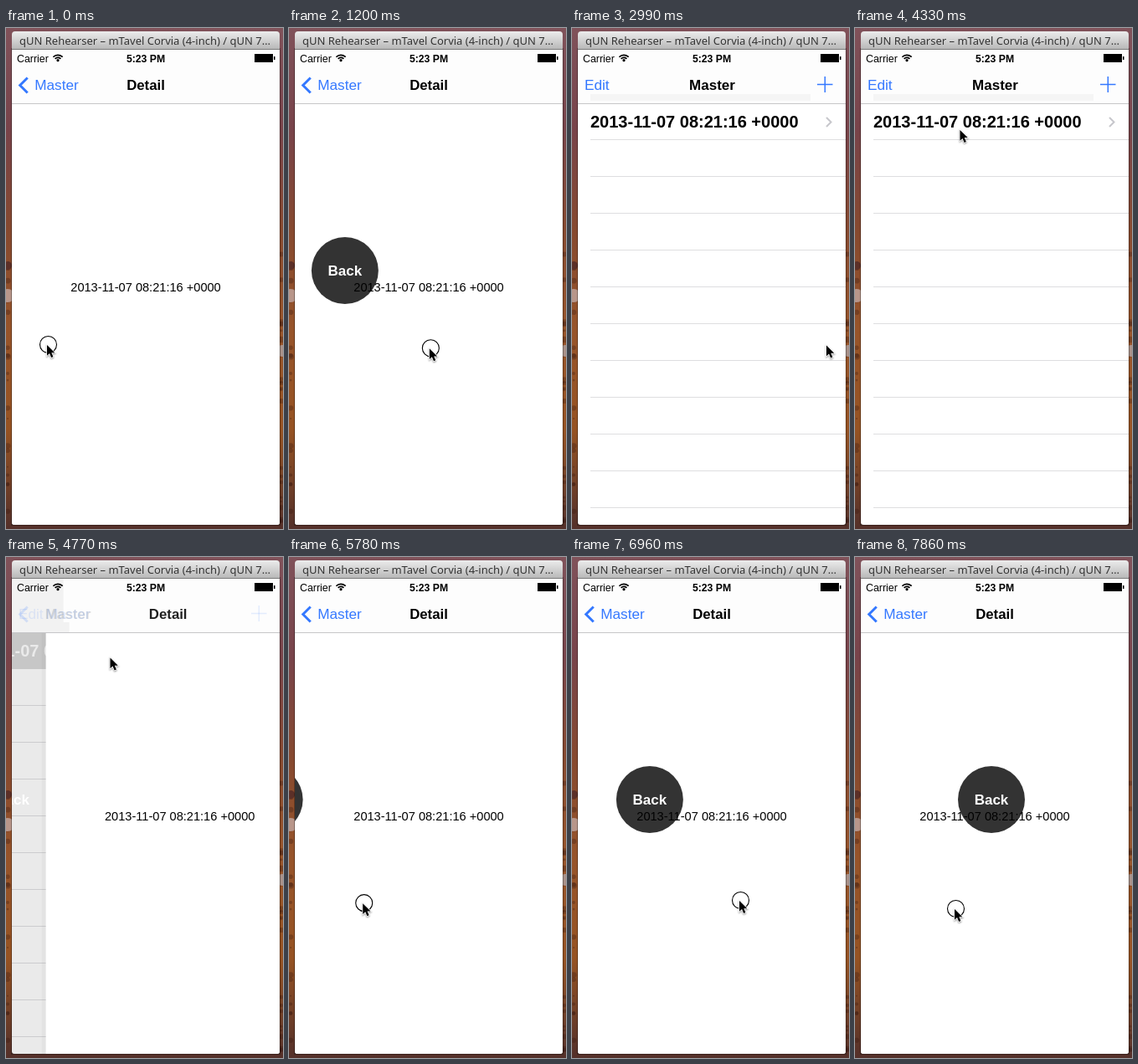
These frames come from a looping animation (331x599 px, 8 s). An HTML page with a canvas:

```html
<!DOCTYPE html>
<html lang="en">
<head>
<meta charset="utf-8">
<title>Swipe back</title>
<style>
html, body { margin: 0; width: 100%; height: 100%; overflow: hidden; }
canvas { display: block; width: 331px; height: 599px; }
</style>
</head>
<body>
<canvas id="stage"></canvas>
<script>
const W = 331, H = 599, LOOP = 8000, TICK = 148, LAST_TICK = 53;
const LEFT = 7, RIGHT = 327, TOP = 26, NAV = 90, BOTTOM = 594;
const POP = 2575, HIGHLIGHT = 4420, PUSH = 4573, PRESS = 5300, TURN = 7050, END = 7844;
const SANS = '"Liberation Sans", Arial, sans-serif';
const BLUE = '#3478ff', STAMP = '2013-11-07 08:21:16 +0000';
const canvas = document.getElementById('stage');
const ctx = canvas.getContext('2d');
const dpr = window.devicePixelRatio || 1;
canvas.width = W * dpr;
canvas.height = H * dpr;

const lerp = (a, b, k) => a + (b - a) * k;

function ease(from, to, t) {
  const u = Math.min(1, Math.max(0, (t - from) / (to - from)));
  return u * u * (3 - 2 * u);
}

// Critically damped spring: 1 at the start, settling to 0.
function spring(ms) {
  const x = Math.max(0, ms) * 0.022;
  return x > 8 ? 0 : (1 + x) * Math.exp(-x);
}

// 0 = detail on screen, 1 = master on screen
const pageShift = t => t < 3800 ? 1 - spring(t - POP) : spring(t - PUSH);
const isPressed = t => t < POP || t >= PRESS;

// Each stroke eases the pointer to a new place, bowing down a little on the way.
const STROKES = [
  { from: 320, to: 2130, x: 305.5, y: 379, bow: 4 },
  { from: 3440, to: 4330, x: 126, y: 120, bow: 0 },
  { from: 4780, to: PRESS, x: 62, y: 413, bow: 0 },
  { from: 5350, to: 6825, x: 201.5, y: 410.5, bow: 2 },
  { from: TURN, to: END, x: 120.5, y: 420.5, bow: 0 }
];

function pointerAt(t) {
  let x = 50.5, y = 378.5;
  for (const s of STROKES) {
    const k = ease(s.from, s.to, t);
    x = lerp(x, s.x, k);
    y = lerp(y, s.y, k) + s.bow * Math.sin(Math.PI * k);
  }
  return { x, y };
}

// The badge follows the drag from beyond the left edge.
function badgeAt(t, x) {
  if (t < 3000) return Math.min(167, x - 102.5);
  if (!isPressed(t)) return -33;
  return t < TURN ? x * 1.04 - 116.7 : lerp(92.5, 163, ease(TURN, END, t));
}

function text(s, x, y, size, color, { bold = false, align = 'left', alpha = 1, family = SANS } = {}) {
  if (alpha <= 0) return;
  ctx.save();
  ctx.globalAlpha *= alpha;
  ctx.font = (bold ? 'bold ' : '') + size + 'px ' + family;
  ctx.textAlign = align;
  ctx.fillStyle = color;
  ctx.fillText(s, x, y);
  ctx.restore();
}

function box(x, y, w, h, color) {
  ctx.fillStyle = color;
  ctx.fillRect(x, y, w, h);
}

function line(points, color, width, alpha = 1) {
  ctx.save();
  ctx.globalAlpha *= Math.max(0, alpha);
  ctx.beginPath();
  points.forEach(p => ctx.lineTo(...p));
  ctx.strokeStyle = color;
  ctx.lineWidth = width;
  ctx.stroke();
  ctx.restore();
}

function disc(x, y, r, color) {
  ctx.beginPath();
  ctx.arc(x, y, r, 0, Math.PI * 2);
  ctx.fillStyle = color;
  ctx.fill();
}

function fade(y0, y1, colors) {
  const g = ctx.createLinearGradient(0, y0, 0, y1);
  colors.forEach((color, i) => g.addColorStop(i / (colors.length - 1), color));
  return g;
}

function wallpaper() {
  box(0, 0, W, H, fade(0, H, ['#80525a', '#78434a', '#86492f', '#97542a', '#965323', '#54302a']));
  let seed = 11;
  const random = () => (seed = seed * 16807 % 2147483647) / 2147483647;
  for (let i = 0; i < 40; i++) {
    const x = random() < 0.5 ? 2 : 329;
    disc(x, lerp(270, 590, random()), 1 + 3 * random(), 'rgba(50,20,12,.3)');
  }
  disc(2, 284, 5, '#5c3028');
  disc(2, 320, 8, '#b8968a');
  disc(330, 386, 7, '#a89088');
  box(LEFT - 1, 24, RIGHT - LEFT + 2, BOTTOM - 23, 'rgba(0,0,0,.3)');
}

function titleBar() {
  ctx.beginPath();
  ctx.roundRect(LEFT, 4, RIGHT - LEFT, 22, [4, 4, 0, 0]);
  ctx.fillStyle = fade(4, 26, ['#ececec', '#b6b6b6']);
  ctx.fill();
  box(LEFT, 25, RIGHT - LEFT, 1, '#7c7c7c');
  text('qUN Rehearser – mTavel Corvia (4-inch) / qUN 7…', 16, 20, 13, '#333',
    { family: '"Noto Sans", sans-serif' });
}

function master(shift, lit) {
  const x = LEFT - 96 * (1 - shift);
  box(LEFT, NAV, RIGHT - LEFT, BOTTOM - NAV, '#fff');
  for (let y = 133; y < BOTTOM; y += 44) box(x + 15, y, 305, 1, '#dedee0');
  ctx.save();
  ctx.globalAlpha = lit;
  box(x, 91, 320, 43, '#d9d9d9');
  ctx.restore();
  text(STAMP, x + 15, 119, 20, '#000', { bold: true, alpha: 1 - lit });
  text(STAMP, x + 15, 119, 20, '#fff', { bold: true, alpha: lit });
  line([[x + 297, 107], [x + 302.5, 112.5], [x + 297, 118]], '#c7c7cc', 2);
  box(LEFT, NAV, RIGHT - LEFT, BOTTOM - NAV, `rgba(0,0,0,${0.095 * (1 - shift)})`);
}

function detail(off) {
  if (off > 0) box(LEFT + off - 5, NAV, 5, BOTTOM - NAV, 'rgba(0,0,0,.03)');
  box(LEFT + off, NAV, RIGHT - LEFT, BOTTOM - NAV, '#fff');
  text(STAMP, 167 + off, 315, 14.6, '#000', { align: 'center' });
}

function badge(x, solid) {
  if (solid) disc(x, 290, 40, 'rgba(0,0,0,.8)');
  text('Back', x, 296, 17, '#fff', { bold: true, align: 'center' });
}

function statusBar() {
  text('Carrier', 13, 41, 12.4, '#000');
  text('5:23 PM', 167, 41, 12.2, '#000', { bold: true, align: 'center' });
  ctx.strokeStyle = '#000';
  ctx.lineWidth = 1.7;
  for (const r of [4.6, 7.7]) {
    ctx.beginPath();
    ctx.arc(62, 40, r, -Math.PI * 0.76, -Math.PI * 0.24);
    ctx.stroke();
  }
  disc(62, 38.7, 1.6, '#000');
  box(297, 31, 22, 10, '#000');
  box(320, 34, 1.5, 4, '#000');
}

function navBar(q, t) {
  box(LEFT, TOP, RIGHT - LEFT, NAV - TOP, '#fdfdfd');
  if (q > 0 && q < 1) {
    const tint = `rgba(0,0,0,${0.05 * (1 - q)})`;
    const w = Math.min(320, 320 * q + 21);
    box(LEFT, TOP, w, 52, tint);
    box(LEFT, 78, Math.min(320, w + 7), 12, tint);
  }
  if (q === 1) box(22, 79, 263, 8, '#f5f5f5');
  box(LEFT, NAV, RIGHT - LEFT, 1, '#c6c6c8');
  statusBar();

  const x = lerp(60.5, 167.5, q), backAlpha = 1 - 6.5 * q;
  const mid = { align: 'center' };
  text('Master', x, 74, 17, '#000', { ...mid, bold: true, alpha: q });
  text('Master', x, 74, 17.2, BLUE, { ...mid, alpha: backAlpha });
  text('Detail', 167 + 210 * q, 74, 16.8, '#000', { ...mid, bold: true, alpha: 1 - q });
  text('Edit', 15, 74, 17.2, BLUE, { alpha: q });
  line([[25.7, 59.5], [16.7, 68.5], [25.7, 77.5]], BLUE, 3, backAlpha);
  line([[293, 67.5], [311.5, 67.5]], BLUE, 1.5, q);
  line([[302.3, 58], [302.3, 77]], BLUE, 1.5, q);
}

function pointer({ x, y }, pressed) {
  if (pressed) {
    ctx.beginPath();
    ctx.arc(x, y, 10, 0, Math.PI * 2);
    ctx.strokeStyle = '#000';
    ctx.lineWidth = 1.1;
    ctx.stroke();
  }
  ctx.save();
  ctx.translate(x - 1.5, y + 0.5);
  ctx.scale(0.95, 0.95);
  ctx.beginPath();
  [[0, 0], [0, 13.5], [3.2, 10.6], [5.4, 15.8], [7.8, 14.8], [5.6, 9.7], [9.8, 9.7]]
    .forEach(p => ctx.lineTo(...p));
  ctx.closePath();
  ctx.shadowColor = 'rgba(0,0,0,.45)';
  ctx.shadowBlur = 2 * dpr;
  ctx.shadowOffsetY = dpr;
  ctx.strokeStyle = '#fff';
  ctx.lineWidth = 1.6;
  ctx.stroke();
  ctx.shadowColor = 'transparent';
  ctx.fillStyle = '#000';
  ctx.fill();
  ctx.restore();
}

function draw(t) {
  const q = pageShift(t), off = 320 * q;
  const lit = t < 3800 ? 1 - q : Number(t >= HIGHLIGHT);
  const hand = pointerAt(t);
  ctx.setTransform(dpr, 0, 0, dpr, 0, 0);
  wallpaper();
  titleBar();

  ctx.save();
  ctx.beginPath();
  ctx.roundRect(LEFT, TOP, RIGHT - LEFT, BOTTOM - TOP, [0, 0, 3, 3]);
  ctx.clip();
  master(q, lit);
  if (q < 1) {
    detail(off);
    badge(badgeAt(t, hand.x) + off, t < 3000 || isPressed(t));
  }
  navBar(q, t);
  ctx.restore();

  pointer(hand, isPressed(t));
}

const start = performance.now();
function loop() {
  const now = (performance.now() - start) % LOOP;
  draw(Math.min(LAST_TICK, Math.floor(now / TICK)) * TICK);
  requestAnimationFrame(loop);
}
loop();
</script>
</body>
</html>
```
